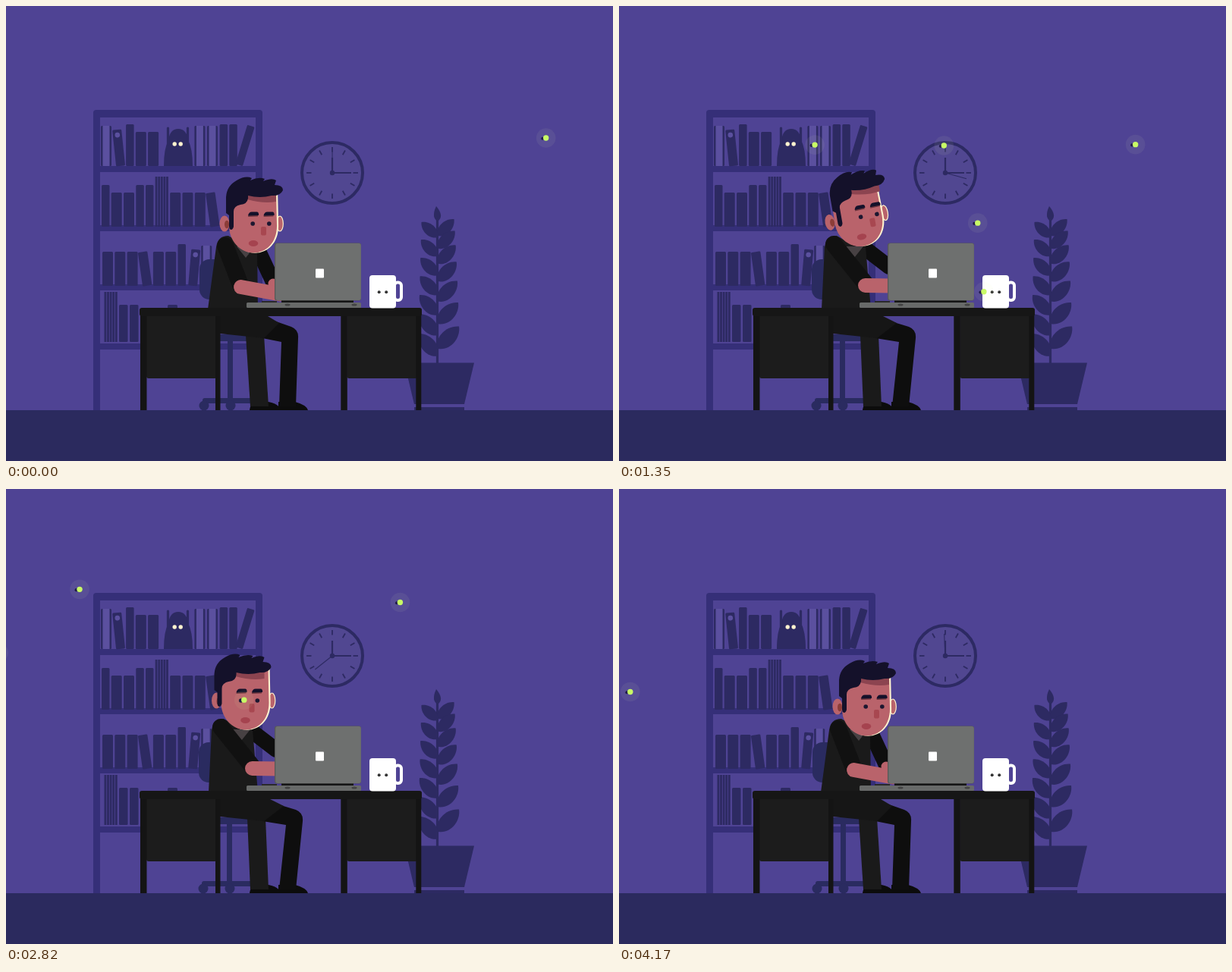
Animation of 800 by 600 pixels, one loop 4.2 s. Source, as an HTML page:

```html
<!DOCTYPE html>
<html lang="en">
<head>
<meta charset="utf-8">
<title>Night shift</title>
<style>
html, body { margin: 0; width: 100%; height: 100%; overflow: hidden; background: #4f4394; }
svg { display: block; width: 100vw; height: 100vh; }
</style>
</head>
<body>
<svg id="stage" viewBox="0 0 800 600"></svg>
<script>
const LOOP = 4200;
const NAVY = '#2d2a62', SHELF = '#352f78', PALE = '#5b509f', CHAIR = '#2a2b60';
const SKIN = '#b9636b', HAIR = '#14112a', GLOW = '#c8fa66', CREAM = '#fff3cf';

const rect = (x, y, w, h, fill, r = 0, extra = '') => `<rect x="${x}" y="${y}" width="${w}" height="${h}" rx="${r}" fill="${fill}" ${extra}/>`;
const oval = (x, y, rx, ry, fill, extra = '') => `<ellipse cx="${x}" cy="${y}" rx="${rx}" ry="${ry}" fill="${fill}" ${extra}/>`;
const dot = (x, y, r, fill, extra) => oval(x, y, r, r, fill, extra);
const path = (d, fill, extra = '') => `<path d="${d}" fill="${fill}" ${extra}/>`;
const line = (d, color, width, extra = '') => path(d, 'none', `stroke="${color}" stroke-width="${width}" ${extra}`);
const repeat = (n, draw) => Array.from({ length: n }, (_, i) => draw(i)).join('');

// Kinds of shelf item; each takes up `step` of the row.
const kinds = {
  w: { w: 14, h: 45, step: 16.3 },
  t: { w: 10.5, h: 55, step: 12.7 },
  m: { w: 11.5, h: 49, step: 14 },
  p: { w: 14, h: 53, step: 16.6, pale: true },
  o: { w: 12, h: 48, step: 16.5, lean: -6, mark: true },
  q: { w: 12, h: 48, step: 18, lean: 5, mark: true },
  '\\': { w: 12.5, h: 45, step: 18, lean: -8 },
  '/': { w: 10, h: 54, step: 20, lean: 17 },
  ' ': { step: 45 }
};

function row(x, floor, items) {
  let out = '';
  for (const item of items) {
    const { w, h, step, lean, pale, mark } = kinds[item] || {};
    if (item === 's') {
      const start = x;
      out += repeat(5, i => rect(start + i * 3.6, floor - 66, 2.8, 66, NAVY));
      x += 19.5;
      continue;
    }
    if (w) {
      const left = x + (lean > 0 ? 3 : lean < 0 ? 1 : 0), mid = left + w / 2;
      out += `<g transform="rotate(${lean || 0} ${mid} ${floor - h / 2})">` + rect(left, floor - h, w, h, NAVY, 1.5) +
        (pale ? rect(left + 2.5, floor - h, w - 5, h, PALE) : '') + (mark ? dot(mid, floor - h + 7, 3.3, PALE) : '') + '</g>';
    }
    x += step;
  }
  return out;
}

function bookcase() {
  const creature = path('M208 211Q208 188 214 177Q216 162 227 162Q238 162 240 177Q246 188 246 211Z', NAVY) +
    line('M213.5 161V182M239.5 161V182', NAVY, 3.2, 'stroke-linecap="round"') +
    dot(222.2, 182, 2.7, CREAM) + dot(230.2, 182, 2.7, CREAM);
  return rect(115, 137, 223, 10, SHELF, 4) + rect(115, 140, 9, 393, SHELF) + rect(329, 140, 9, 393, SHELF) +
    repeat(4, i => rect(120, 211 + i * 78, 212, 8, SHELF)) + creature +
    row(125, 211, 'potww pptt/') + row(126, 291, 'twwttswww\\') + row(127, 369, 'www\\wwtqp') +
    row(129.5, 443, 'smm') + rect(213, 394, 13, 49, NAVY, 1.5);
}

function clock() {
  return dot(430, 220, 40, '#514791', 'stroke="#2d2a63" stroke-width="4"') +
    repeat(12, i => line('M430 186v6.5', NAVY, 1.8, `transform="rotate(${i * 30} 430 220)"`)) +
    line('M430 200V220H455', NAVY, 2.2) + dot(430, 220, 3.2, NAVY) +
    `<g id="second">${line('M430 220V191', NAVY, 1.1)}</g>`;
}

function leaf(dx, tipY, rise) {
  const at = (u, v) => `${569 + dx * u + rise * v} ${tipY + rise * (1 - u) + dx * v}`;
  return path(`M${at(0, 0)}C${at(.2, .34)} ${at(.75, .32)} ${at(1, 0)}C${at(.75, -.32)} ${at(.2, -.34)} ${at(0, 0)}Z`, NAVY);
}

function plant() {
  return line('M568.5 280V472', NAVY, 3.2) + path('M567 264Q578 277 569 284Q560 279 567 264Z', NAVY) +
    repeat(7, i => leaf(21.5 + i * 1.1, 281 + 14 * i + 1.6 * i * i, 22 + i * 1.2) +
      leaf(-21.5 - i * .6, 285 + 23 * i + .25 * i * i, 20 + i * 1.6)) +
    path('M525 470.5H617L604 525H538Z', NAVY) + rect(538, 529, 66, 4, NAVY);
}

function chair() {
  return rect(255, 334, 38, 53, CHAIR, 13) + rect(270, 433, 52, 9, CHAIR, 3) + rect(292, 440, 7, 80, CHAIR) +
    rect(259, 517, 72, 7, CHAIR, 3) + dot(261, 527, 6.5, CHAIR) + dot(296, 527, 6.5, CHAIR);
}

function head() {
  const face = 'M295 258Q295 246 325 245H356L357 290C357 312 343 325.5 326 325.5C309 325.5 294 310 294 290Z';
  const brow = x => path(`M${x} 278L${x + 1} 274.5H${x + 13}V277.5Z`, '#6e363f') +
    path(`M${x} 276.5Q${x + 1} 271.5 ${x + 5} 271.5H${x + 12}Q${x + 14.5} 272 ${x + 14} 276Z`, HAIR);
  const hair = path('M317 249H356V258Q339 261 318 255Z', '#8c4450') +
    path('M290 273V252Q291 237 304 230Q316 223 324 227L322 230Q333 225 341 228L339 231Q351 226 356 230L354 236Q365 236 365 243Q361 251 350 250Q335 254 319 250Q320 261 309 262Q300 264 300 271V291Q299 295 296.5 295Q294 294 294 291V276Z', HAIR);
  return oval(288, 287, 6.5, 10.5, SKIN) + oval(291, 288, 3, 5.2, '#8c3d38') +
    oval(361, 287, 4.3, 10, SKIN, `stroke="${CREAM}" stroke-width="1.2"`) +
    path(face, CREAM, 'transform="translate(2.1 .3)"') + path(face, SKIN) + oval(326, 313, 6.3, 4, '#a5434f') +
    `<g id="features">${hair}${brow(319)}${brow(339.5)}${dot(325.2, 287, 2.8, '#1c1730')}${dot(346.8, 287, 2.8, '#1c1730')}${rect(336, 291, 7, 11.5, '#a84750', 2)}</g>`;
}

function desk() {
  const pedestal = (x, legW) => rect(x + 8, 405, 93, 86, '#1c1c1c', 3) + rect(x, 405, 8.5, 128, '#141414') + rect(x + 99, 405, legW, 128, '#141414');
  return pedestal(177, 6.5) + pedestal(441.3, 7) + rect(176, 398, 372, 11, '#161616', 3);
}

function laptop() {
  return rect(337, 389, 20, 3, '#2a2a2a') + rect(363, 386, 95, 6, '#151515') +
    rect(354, 312.5, 114, 76, '#565857', 3) + rect(355.2, 313, 112.6, 75, '#6e706f', 3) +
    rect(317, 391, 151, 7, '#686a69', 1.5) + oval(371, 394, 3.5, 1.5, '#444') + oval(459, 394, 3.5, 1.5, '#444') +
    rect(408, 346.5, 11, 12, '#fff', 1);
}

function mug() {
  return rect(512, 364.5, 9, 23.5, 'none', 4, 'stroke="#fff" stroke-width="4"') + rect(479, 355, 35, 43.5, '#fff', 4) +
    dot(491.7, 377.3, 2, '#333') + dot(501.2, 377.3, 2, '#333');
}

// Speeds are in pixels per second; `bend` curves the path, `orbit` makes it circle.
const flies = [
  { born: 0, speed: 336, y: 174, rise: -55, bend: 45.7 },
  { born: 399, speed: 298, y: 334, rise: -228, bend: 74 },
  { born: 733, speed: 374, y: 360, rise: 45, bend: -29 },
  { born: 195, speed: 158.5, x: 690, y: 279, orbit: 45 },
  { born: 1272, speed: 397, y: 194, rise: -149, bend: 70.5 },
  { born: 2428, speed: 490, y: 139, rise: 7, bend: 50 },
  { born: 1375, speed: 873, x: 850, y: 134, rise: 27, big: true }
];

const firefly = ({ big }, i) => {
  const size = big ? 2.7 : 1;
  return `<g id="fly${i}">` + dot(0, 0, 12.8 * size, '#f5ffb4', 'opacity=".065"') +
    oval(big ? -13.5 : -4.5, .8, 2 * size, 2.1 * size, '#211c49') + dot(0, 0, 3.7 * size, GLOW) + '</g>';
};

function flyAt({ born, speed, x = 712, y, rise = 0, bend = 0, orbit = 0 }, t) {
  const s = (t - born) / 1000, turn = s * 2 * Math.PI / 3.18;
  return [x - speed * s - orbit * Math.sin(turn), y + rise * s + bend * s * s - orbit * .6 * Math.cos(turn - .445)];
}

document.getElementById('stage').innerHTML =
  rect(0, 0, 800, 600, '#4f4394') + bookcase() + clock() + plant() + rect(0, 533, 800, 67, '#2b2a5e') +
  `<g id="chair">${chair()}</g><g id="body"></g><g id="head">${head()}</g><g id="arm"></g>` +
  desk() + laptop() + mug() + flies.map(firefly).join('');

const el = id => document.getElementById(id);
const flyNodes = flies.map((_, i) => el('fly' + i));
const parts = {};
for (const id of ['second', 'chair', 'body', 'head', 'features', 'arm']) parts[id] = el(id);
const move = (node, transform) => node.setAttribute('transform', transform);

// Eased step from 0 to 1 between two times.
function ramp(t, from, to) {
  const u = Math.min(1, Math.max(0, (t - from) / (to - from)));
  return u * u * (3 - 2 * u);
}

function drawBody(s, lean) {
  const k = lean * 6;
  return path('M321 533Q322 521 338 521Q358 522 363 533Z', '#0c0c0c') + path('M359 533V522H381Q396 526 398 533Z', '#0c0c0c') +
    path(`M${316 + lean * 2} 434H${340 + lean * 2}L346 528H322Z`, '#1a1a1a') +
    path(`M336 409L${376 + k} 423Q${386 + k} 427 ${385 + k} 438L382 528H360L${363 + k} 443L338 438Z`, '#0e0e0e') +
    path(`M277 400H330L${360 + k} 418L340 438L282 432Z`, '#161616') +
    line(`M${332 + s} 321L${352 + lean * 4} ${364 - lean * 20}`, '#0e0e0e', 20, 'stroke-linecap="round"') +
    dot(352, 366, 6.5 * (1 - lean), SKIN) +
    path(`M${266 + lean} 400L${277 + s} 318Q${279 + s} 303 ${293 + s} 303L${316 + s} 316L${331 + s} 318L332 400Z`, '#1a1a1a') +
    path(`M${304 + s} 317H${328 + s}L${316 + s} 332Z`, '#474143');
}

function drawArm(s, lean) {
  const x = 309.5 + lean * 15, y = 370.5 - lean * 2;
  return line(`M${289 + s} ${316 - lean * 2}L${x - 1} ${y - 4}`, '#111', 22, 'stroke-linecap="round"') +
    line(`M${x} ${y}L361 ${380 - lean * 11}`, SKIN, 19, 'stroke-linecap="round"');
}

function render(t) {
  const wake = ramp(t, 0, 500);
  const lean = wake - ramp(t, 3570, 4080);
  const back = wake - .6 * (ramp(t, 1710, 2310) - ramp(t, 2310, 2820)) - ramp(t, 2820, 3570);
  const tilt = wake - ramp(t, 1710, 2600);
  const gaze = 4 * tilt - 5 * (ramp(t, 1710, 2820) - ramp(t, 2820, 3570));
  const shift = -6 * back;
  move(parts.chair, `translate(${-lean} 0)`);
  parts.body.innerHTML = drawBody(shift, lean);
  parts.arm.innerHTML = drawArm(shift, lean);
  move(parts.head, `translate(${-10.5 * back} ${-8 * back}) rotate(${-10 * tilt} 324.5 287)`);
  move(parts.features, `translate(${gaze} 0)`);
  move(parts.second, `rotate(${360 * t / LOOP - 12 * Math.sin(Math.PI * t / LOOP)} 430 220)`);
  flies.forEach((fly, i) => {
    const [x, y] = flyAt(fly, t);
    flyNodes[i].setAttribute('visibility', t >= fly.born && x > -60 ? 'visible' : 'hidden');
    move(flyNodes[i], `translate(${x} ${y})`);
  });
}

const start = performance.now();
function tick() {
  render((performance.now() - start) % LOOP);
  requestAnimationFrame(tick);
}
tick();
</script>
</body>
</html>
```
